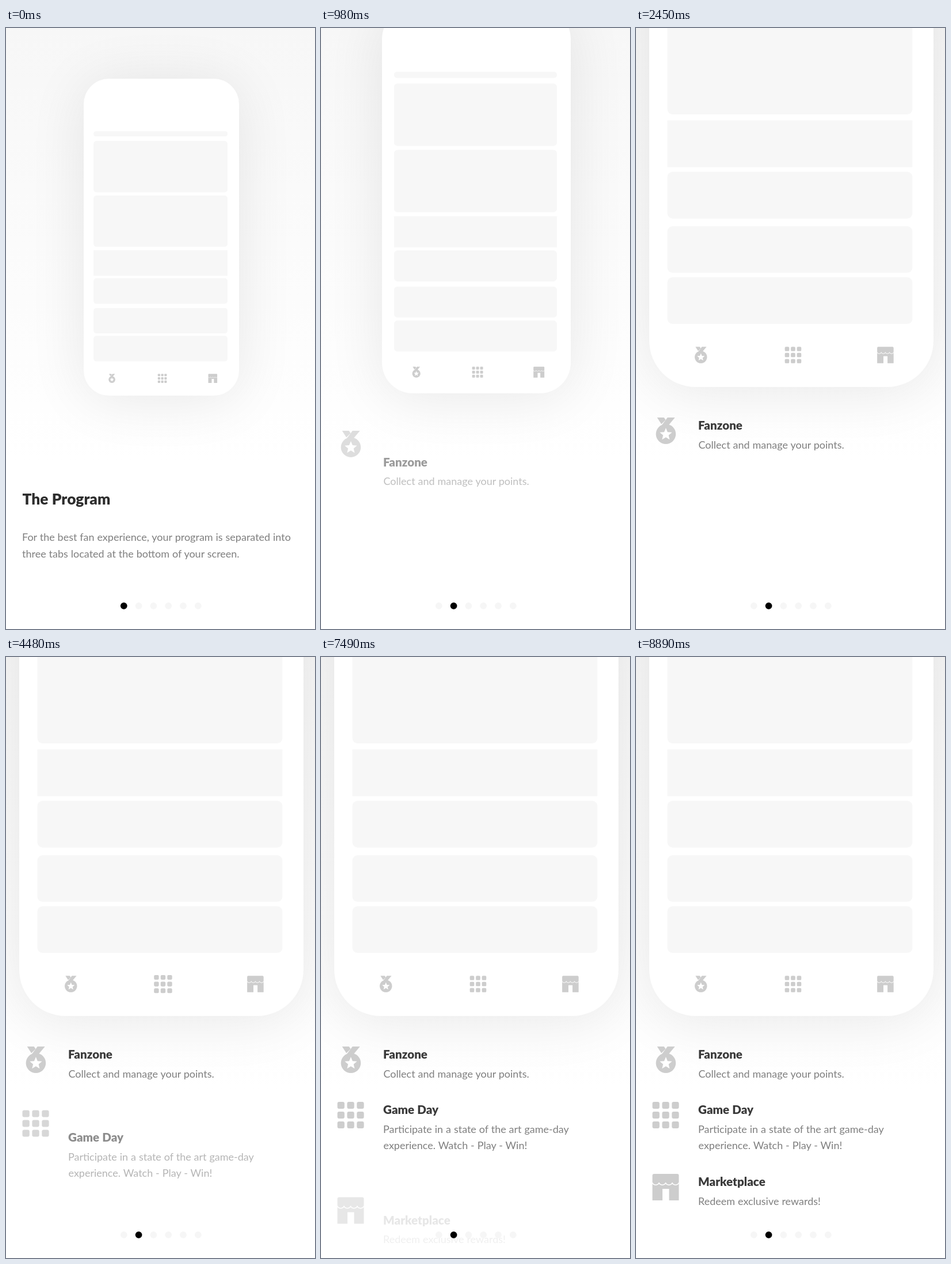
Recreate the animation shown at these times as an HTML page. Size 537 by 1043 pixels, loop 8.96 s.

```html
<!DOCTYPE html>
<html lang="en">
<head>
<meta charset="utf-8">
<title>The Program</title>
<style>
  html, body { margin: 0; width: 100%; height: 100%; overflow: hidden; }
  body {
    position: relative;
    background: linear-gradient(#f7f7f7, #fff 750px) #fff;
    font-family: Lato, "Open Sans", sans-serif;
  }
  svg { display: block; }
  /* --p runs from 0 (whole phone) to 1 (zoomed on the tab bar) */
  #phone {
    --w: calc(270px + 224px * var(--p, 0));
    --h: calc(var(--w) * 550 / 270);
    position: absolute;
    left: calc(270px - var(--w) / 2);
    top: calc(638px - 15.5px * var(--p, 0) - var(--h));
    width: var(--w);
    height: var(--h);
    border-radius: calc(var(--w) * .163);
    background: #fff;
    box-shadow: 0 6px 100px rgba(0, 0, 0, .092);
  }
  #phone svg { width: 100%; height: 100%; }
  #stage { position: absolute; left: 0; top: 0; }
  .block { fill: #f7f7f7; }
  .icon { fill: #cdcdcd; }
  text { font-size: 18px; word-spacing: .3px; fill: #7f7f7f; }
  .head { font-size: 20.6px; font-weight: 900; fill: #3a3a3a; }
  .title { font-size: 26.3px; font-weight: 900; fill: #2d2d2d; }
</style>
</head>
<body>
<div id="phone">
  <svg viewBox="0 0 270 550">
    <g class="block" id="blocks"></g>
    <g class="icon">
      <g data-tab="49"><use href="#medal" x="-23" y="-23"/></g>
      <g data-tab="136.6"><use href="#grid" x="-23" y="-23"/></g>
      <g data-tab="224.3"><use href="#shop" x="-23" y="-23"/></g>
    </g>
  </svg>
</div>

<svg id="stage" width="537" height="1043" viewBox="0 0 537 1043">
  <defs>
    <g id="medal">
      <path d="M8 0H20L22.8 4.2L15.4 11.6Z"/>
      <path d="M26 0H39L28.6 12.4L23 15L16.4 13Z"/>
      <circle cx="23.2" cy="28.7" r="17.3"/>
      <path id="star" fill="#fff"/>
    </g>
    <g id="grid"></g>
    <g id="shop">
      <path d="M3 0H43Q46 0 46 3V46H29V26H17.5V46H0V3Q0 0 3 0Z"/>
      <path d="M0 15a5.75 4.2 0 0 0 11.5 0a5.75 4.2 0 0 0 11.5 0a5.75 4.2 0 0 0 11.5 0a5.75 4.2 0 0 0 11.5 0"
            fill="none" stroke="#fff" stroke-width="1.5"/>
    </g>
  </defs>

  <g id="intro">
    <text class="title" x="28.5" y="827">The Program</text>
    <text x="28" y="890">For the best fan experience, your program is separated into</text>
    <text x="28" y="918.5">three tabs located at the bottom of your screen.</text>
  </g>

  <g class="item">
    <g class="icon"><use href="#medal" x="28.7" y="676"/></g>
    <g>
      <text class="head" x="108" y="697">Fanzone</text>
      <text x="108.5" y="729.5">Collect and manage your points.</text>
    </g>
  </g>
  <g class="item">
    <g class="icon"><use href="#grid" x="28.5" y="772"/></g>
    <g>
      <text class="head" x="108" y="793">Game Day</text>
      <text x="108" y="825.5">Participate in a state of the art game-day</text>
      <text x="108.5" y="854">experience. Watch - Play - Win!</text>
    </g>
  </g>
  <g class="item">
    <g class="icon"><use href="#shop" x="28.5" y="897"/></g>
    <g>
      <text class="head" x="108" y="918">Marketplace</text>
      <text x="108" y="950.5">Redeem exclusive rewards!</text>
    </g>
  </g>
  <g id="dots"></g>
</svg>

<script>
const LOOP = 8960, STEP = 70;
const $ = id => document.getElementById(id);
const clamp = x => Math.min(1, Math.max(0, x));
const smooth = x => { x = clamp(x); return x * x * (3 - 2 * x); };

// Critically damped spring, scaled so that it comes to rest.
const rise = x => x <= 0 ? 0 : 1 - (1 + x) * Math.exp(-x);
const spring = ms => clamp(rise(ms * .0045) / rise(7.5));

const rect = (x, y, w, h, r) =>
  `<rect x="${x}" y="${y}" width="${w}" height="${h}" rx="${r}"/>`;

// Phone blocks: top, height, radius
$('blocks').innerHTML = [
  [91.3, 8.8, 4], [108, 89.2, 5], [202.8, 89, 5], [297.5, 44.4, .5],
  [346.3, 44.3, 5], [397.9, 44.2, 5], [446.3, 44.3, 5]
].map(([y, h, r]) => rect(17.2, y, 232.8, h, r)).join('');

$('grid').innerHTML = [...Array(9).keys()]
  .map(i => rect(i % 3 * 16.9, Math.floor(i / 3) * 17, 12.3, 12, 3)).join('');

$('star').setAttribute('d', 'M' + [...Array(10).keys()].map(i => {
  const a = i * Math.PI / 5, r = i % 2 ? 5 : 11.2;
  return (23.2 + r * Math.sin(a)).toFixed(2) + ' ' + (29.2 - r * Math.cos(a)).toFixed(2);
}).join('L') + 'Z');

$('dots').innerHTML = [...Array(6).keys()]
  .map(i => `<circle cx="${204.8 + i * 25.8}" cy="1002.8" r="5.9"/>`).join('');
const dots = [...$('dots').children];
dots.forEach(d => d.setAttribute('fill', '#f6f6f6'));

// show: first visible moment; icon, text: spring starts; dy: travel of each
const plan = [
  { show: 770, icon: 478, text: 607, dyIcon: 68, dyText: 128 },
  { show: 4130, icon: 3847, text: 4053, dyIcon: 66, dyText: 113 },
  { show: 7490, icon: 7146, text: 7359, dyIcon: 75, dyText: 75.6 }
];
const items = [...document.querySelectorAll('.item')];
const tabs = [...document.querySelectorAll('[data-tab]')];

function enter(el, p, dy) {
  el.setAttribute('opacity', p);
  el.setAttribute('transform', `translate(0 ${dy * (1 - p)})`);
}

function grey(el, v) {
  v = Math.round(v);
  el.setAttribute('fill', `rgb(${v},${v},${v})`);
}

function draw(t) {
  const turn = smooth(t / 630);
  $('intro').setAttribute('opacity', 1 - turn);
  grey(dots[0], 246 * turn);
  grey(dots[1], 246 * (1 - turn));
  $('phone').style.setProperty('--p', spring(t - 761));

  plan.forEach((m, i) => {
    const [icon, text] = items[i].children;
    items[i].setAttribute('visibility', t < m.show ? 'hidden' : 'visible');
    enter(icon, spring(t - m.icon), m.dyIcon);
    enter(text, spring(t - m.text), m.dyText);

    const since = t - m.show;
    const pulse = i ? .1 * (smooth(since / 350) - smooth((since - 350) / 1050)) : 0;
    tabs[i].setAttribute('transform',
      `translate(${tabs[i].dataset.tab} 520.1) scale(${.339 * (1 + pulse)})`);
  });
}

const start = performance.now();
function frame() {
  const t = (performance.now() - start) % LOOP;
  draw(Math.floor(t / STEP) * STEP);
  requestAnimationFrame(frame);
}
frame();
</script>
</body>
</html>
```
